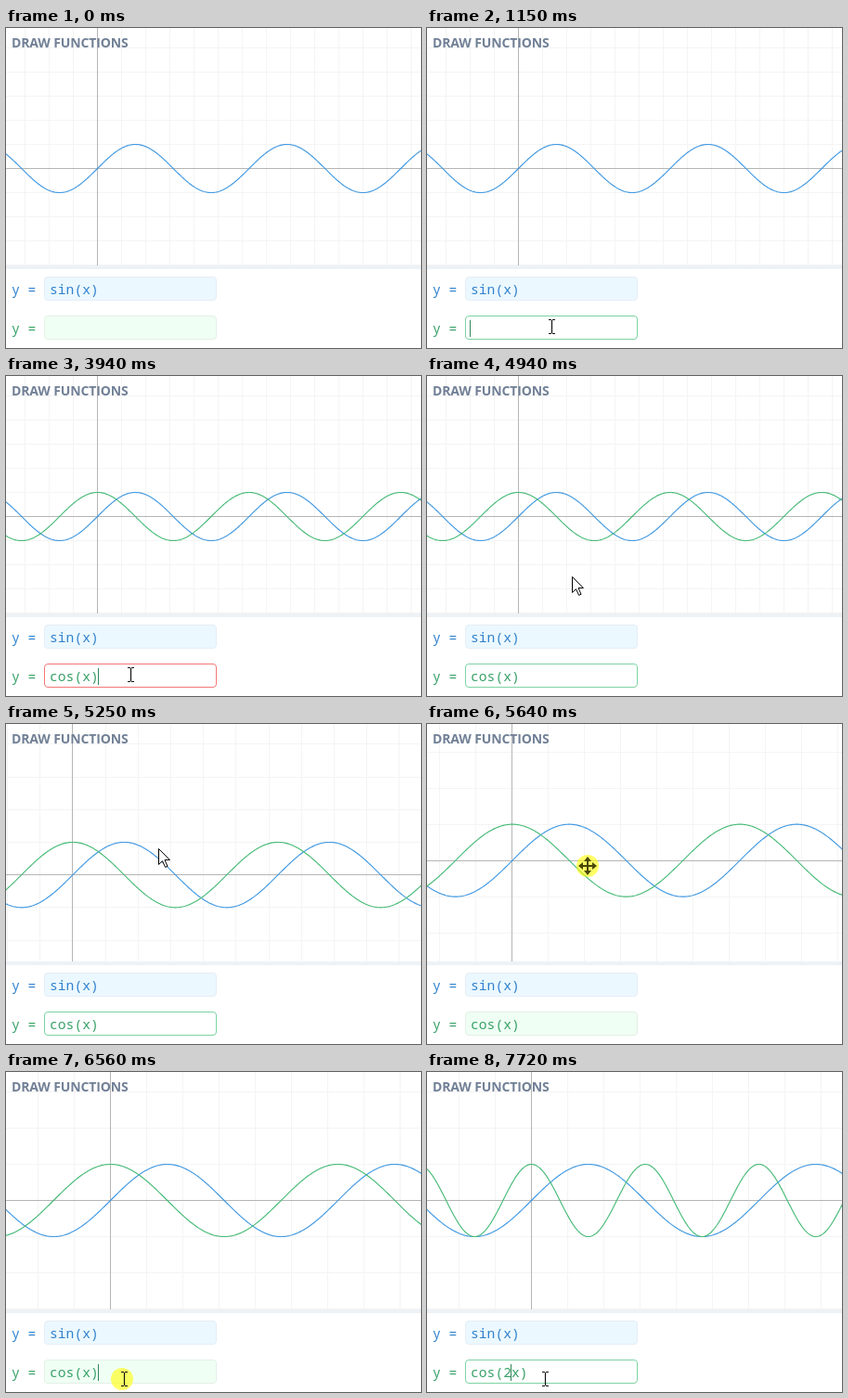
An HTML page with a canvas that plays this animation: 447x345 px, repeating every 8 s.

```html
<!DOCTYPE html>
<html lang="en">
<head>
<meta charset="utf-8">
<title>Draw functions</title>
<style>
  html, body { margin: 0; width: 100%; height: 100%; overflow: hidden; background: #fff; }
  #stage { position: relative; width: 447px; height: 345px; overflow: hidden; }
  #stage > * { position: absolute; box-sizing: border-box; }
  canvas { left: 0; top: 0; }
  h1 {
    left: 6px; top: 6px; margin: 0; white-space: nowrap;
    font: 700 14px/20px "Open Sans", sans-serif; letter-spacing: -.14px; color: #718096;
  }
  #bar { left: 0; top: 256px; width: 447px; height: 4px; background: #edf2f7; }
  .row { left: 0; width: 260px; height: 26px; font: 14.66px/26px "Noto Sans Mono", monospace; white-space: pre; }
  .row > * { position: absolute; box-sizing: border-box; top: 0; height: 26px; }
  .label { left: 6px; }
  .field {
    left: 41px; width: 186px; padding-left: 5px; line-height: 24px;
    border: 1px solid #e6eef5; border-radius: 4px;
  }
  .blue { top: 268px; color: #3182ce; }
  .blue .field { background: #ebf8ff; }
  .green { top: 310px; color: #38a169; }
  #caret { top: 5px; width: 1px; height: 18px; background: #2f855a; }
  #hint { left: 231px; width: 17px; border-radius: 4px; text-align: center; background: #fff5f5; color: #4a2020; }
  svg { left: 0; top: 0; }
</style>
</head>
<body>
<div id="stage">
  <canvas id="graph" width="447" height="256"></canvas>
  <h1>DRAW FUNCTIONS</h1>
  <div id="bar"></div>
  <div class="row blue"><span class="label">y =</span><span class="field">sin(x)</span></div>
  <div class="row green">
    <span class="label">y =</span><span class="field" id="input"></span>
    <i id="caret"></i><span id="hint">?</span>
  </div>
  <svg width="447" height="345">
    <g id="pointer">
      <circle id="press" r="12" fill="#ff0" fill-opacity=".6"/>
      <path id="arrow" d="M.5 .5V17.5L4.5 13.7L7.6 20.4L10 19.3L7 12.6H12.4Z" fill="#fff" stroke="#000"/>
      <path id="beam" d="M-3 -7.5H0M1 -7.5H4M.5 -7V7M-3 7.5H0M1 7.5H4" fill="none" stroke="#111" stroke-width="1.2"/>
      <path id="move" fill="#484806"
        d="M0 -10L4 -5H1V-1H5V-4L10 0L5 4V1H1V5H4L0 10L-4 5H-1V1H-5V4L-10 0L-5 -4V-1H-1V-5H-4Z"/>
    </g>
  </svg>
</div>
<script>
const LOOP = 8000, TICK = 77.45;
const $ = id => document.getElementById(id);
const ctx = $('graph').getContext('2d');

// field looks: border rgb, background rgb
const REST = [227, 240, 232, 240, 255, 244];
const FOCUS = [124, 211, 162, 255, 255, 255];
const ERROR = [245, 119, 119, 255, 255, 255];
const look = [
  [0, ...REST], [990, ...REST], [1140, ...FOCUS], [2240, ...FOCUS], [2390, ...ERROR],
  [3945, ...ERROR], [4095, ...FOCUS], [5410, ...FOCUS], [5560, ...REST],
  [6576, ...REST], [6726, ...FOCUS]
];
// time, text, caret column (-1: hidden)
const typing = [
  [0, '', -1], [990, '', 0], [1535, '', -1], [2065, '', 0], [2235, 'c', 1], [2385, 'co', 2],
  [2615, 'cos', 3], [3075, 'cos(', -1], [3385, 'cos(x', 5], [3615, 'cos(x', -1],
  [3935, 'cos(x)', 6], [4625, 'cos(x)', -1], [6555, 'cos(x)', 6], [7095, 'cos(x)', -1],
  [7245, 'cos(x)', 5], [7415, 'cos(x)', 4], [7645, 'cos(2x)', 5]
];
// time, x, y
const mouse = [
  [130, 279, 334], [300, 215, 329], [480, 158, 324], [670, 134, 322], [4800, 134, 322],
  [4950, 156, 215], [5080, 172, 120], [5255, 165, 133], [5410, 143, 171],
  [5600, 168, 155], [5795, 191, 145], [5870, 194, 144], [5950, 194, 144],
  [6150, 168, 215], [6350, 135, 308], [6480, 127, 331]
];
// time, origin x, origin y, pixels per unit
const view = [
  [0, 98, 151, 26], [5080, 98, 151, 26], [5255, 72, 162, 35], [5335, 61, 165, 39], [5410, 61, 165, 39],
  [5600, 86, 149, 39], [5795, 109, 139, 39], [5870, 112, 138, 39]
];

const within = (t, a, b) => t >= a && t < b;

function at(keys, t) {
  const i = keys.findIndex(k => k[0] > t);
  if (i < 0) return keys[keys.length - 1].slice(1);
  if (i === 0) return keys[0].slice(1);
  const a = keys[i - 1], b = keys[i], p = (t - a[0]) / (b[0] - a[0]);
  return a.slice(1).map((v, j) => v + (b[j + 1] - v) * p);
}

function curve(fn, color, ox, oy, unit) {
  ctx.beginPath();
  for (let x = -1; x <= 448; x++) ctx.lineTo(x, oy + .5 - unit * fn((x - ox - .5) / unit));
  ctx.strokeStyle = color;
  ctx.lineWidth = 1.15;
  ctx.stroke();
}

function drawGraph(t, text) {
  const [ox, oy, unit] = at(view, t);
  ctx.clearRect(0, 0, 447, 256);
  ctx.fillStyle = '#f4f4f4';
  for (let x = ox % unit; x < 447; x += unit) ctx.fillRect(Math.round(x), 0, 1, 256);
  for (let y = oy % unit; y < 256; y += unit) ctx.fillRect(0, Math.round(y), 447, 1);
  ctx.fillStyle = '#b5b5b5';
  ctx.fillRect(Math.round(ox), 0, 1, 256);
  ctx.fillRect(0, Math.round(oy), 447, 1);
  curve(Math.sin, '#4299e1', ox, oy, unit);
  if (text.endsWith(')')) {
    const k = text.includes('2') ? 2 : 1;
    curve(x => Math.cos(k * x), '#48bb78', ox, oy, unit);
  }
}

function drawField(t, text, column) {
  const c = at(look, t), input = $('input');
  input.textContent = text;
  input.style.borderColor = `rgb(${c.slice(0, 3)})`;
  input.style.background = `rgb(${c.slice(3)})`;
  $('caret').style.left = Math.round(46 + 8.8 * column) + 'px';
  show('caret', column >= 0);
  show('hint', text && !text.endsWith(')'));
}

function show(id, on) {
  $(id).style.visibility = on ? 'visible' : 'hidden';
}

function drawPointer(t) {
  const [x, y] = at(mouse, t).map(Math.round);
  const seen = t >= 130, drag = within(t, 5410, 5900);
  const beam = within(x, 41, 227) && within(y, 310, 336);
  $('pointer').setAttribute('transform', `translate(${x} ${y})`);
  $('press').setAttribute('cx', drag ? 0 : -2);
  show('press', drag || within(t, 985, 1145) || within(t, 6555, 6705));
  show('move', drag);
  show('beam', seen && beam);
  show('arrow', seen && !drag && !beam);
}

function frame() {
  const now = performance.now() % LOOP;
  const t = 147 + Math.floor((now - 123) / TICK) * TICK;
  const [, text, column] = typing.filter(k => k[0] <= Math.max(t, 0)).pop();
  drawGraph(t, text);
  drawField(t, text, column);
  drawPointer(t);
  requestAnimationFrame(frame);
}
frame();
</script>
</body>
</html>
```
